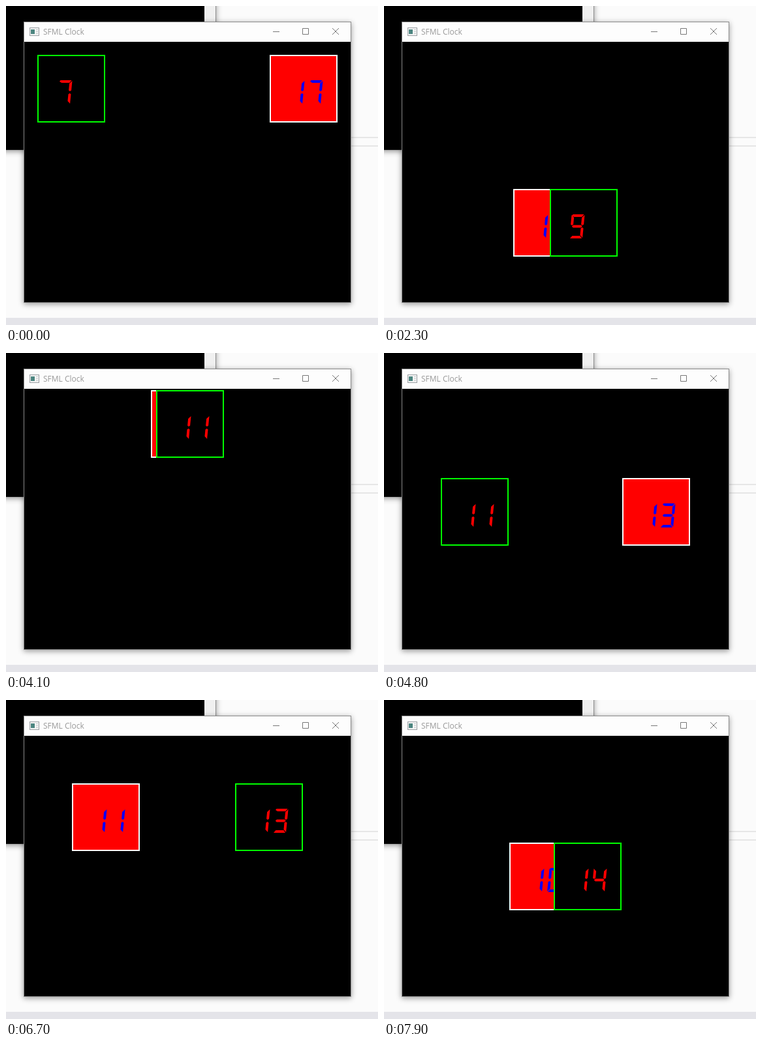
Write an HTML page that moves like this. It is 570 by 490 pixels and loops after 8 s.

```html
<!DOCTYPE html>
<html lang="en">
<head>
<meta charset="utf-8">
<title>SFML Clock</title>
<style>
html, body { margin: 0; width: 100%; height: 100%; overflow: hidden; background: #fbfbfb; }
svg { display: block; }
.shadow { filter: drop-shadow(0 2px 4px rgba(0, 0, 0, .4)); }
text { font: 12px "Open Sans", "Noto Sans", sans-serif; fill: #999; }
</style>
</head>
<body>
<svg width="570" height="490" viewBox="0 0 570 490">
  <rect width="570" height="490" fill="#fbfbfb"/>
  <path d="M528 202h42M528 215h42" stroke="#e6e6e6" stroke-width="2"/>
  <rect y="479" width="570" height="11" fill="#e4e4e9"/>

  <!-- console behind -->
  <g class="shadow">
    <rect x="-20" y="-20" width="342" height="241.5" fill="#8c8c8c"/>
    <rect x="304" y="-20" width="17" height="241" fill="#f0f0f0"/>
    <rect x="-20" y="-20" width="324" height="241" fill="#000"/>
  </g>

  <!-- clock window -->
  <rect class="shadow" x="27" y="24" width="502" height="432" fill="#8a8a8a"/>
  <rect x="28" y="25" width="500" height="30" fill="#fdfdfd"/>
  <rect x="28" y="55" width="500" height="400" fill="#000"/>
  <rect x="36.5" y="33.5" width="14" height="12" fill="#f4f4f4" stroke="#9a9fa3"/>
  <rect x="38" y="36" width="6" height="7" fill="#4b8580"/>
  <path d="M46 36.500h3M46 39.500h3M46 42.500h3" stroke="#c3c7c9"/>
  <text x="57" y="44">SFML Clock</text>
  <path d="M409 39.500h10M454.500 34.500h9v9h-9zM500 34l10 10M510 34l-10 10" fill="none" stroke="#777"/>

  <clipPath id="view"><rect x="28" y="55" width="500" height="400"/></clipPath>
  <g clip-path="url(#view)">
    <g id="down">
      <rect x="1" y="1" width="102" height="102" fill="#f00" stroke="#fff" stroke-width="2"/>
      <path fill="#00f"/>
    </g>
    <g id="up">
      <rect x="1" y="1" width="102" height="102" fill="#000" stroke="#0f0" stroke-width="2"/>
      <path fill="#f00"/>
    </g>
  </g>
</svg>
<script>
// Seven segments a..g, upright, in a 20 x 37 cell
const SEGMENTS = [
  [2, 0, 19, 0, 16, 4, 4, 4, .6, 2],
  [20, 1, 20, 15.5, 18, 17, 16, 15.5, 16, 5],
  [18, 20, 20, 21.5, 20, 36, 16, 32, 16, 21.5],
  [4, 33, 16, 33, 19, 37, 1, 37],
  [2, 20, 4, 21.5, 4, 32, 0, 36, 0, 21.5],
  [0, 1, 4, 5, 4, 15.5, 2, 17, 0, 15.5],
  [4, 16.5, 16, 16.5, 18, 18.5, 16, 20.5, 4, 20.5, 2, 18.5]
];
const DIGITS = ['abcdef', 'bc', 'abged', 'abgcd', 'fgbc', 'afgcd', 'afgedc', 'abc', 'abcdefg', 'abcdfg'];
const SLANT = 3.6 / 37;

// Time in ms and distance travelled along each axis; the view stalls twice
const TRAVEL = [[0, 0], [1000, 0], [1500, 88], [2300, 250], [3400, 475], [4800, 761], [5400, 880],
  [5500, 1000], [5900, 1000], [6000, 1005], [6700, 1147], [7900, 1388]];

function travel(t) {
  const i = Math.max(1, TRAVEL.findIndex(k => k[0] >= t));
  const [t0, d0] = TRAVEL[i - 1], [t1, d1] = TRAVEL[i];
  return d0 + (d1 - d0) * (t - t0) / (t1 - t0);
}

// Bounce back and forth between 0 and size
function bounce(p, size) {
  const m = (p + 2 * size) % (2 * size);
  return m < size ? m : 2 * size - m;
}

function segmentPath(points, left) {
  let d = '';
  for (let i = 0; i < points.length; i += 2) {
    const x = points[i], y = points[i + 1];
    d += (i ? 'L' : 'M') + (left + x + (37 - y) * SLANT) + ' ' + (39 + y);
  }
  return d + 'Z';
}

function numberPath(n) {
  return [...String(n)].map((digit, i) =>
    [...DIGITS[digit]].map(s => segmentPath(SEGMENTS['abcdefg'.indexOf(s)], 30 + 28 * i)).join('')
  ).join('');
}

function place(id, x, y, n) {
  const box = document.getElementById(id);
  box.setAttribute('transform', `translate(${Math.round(x)} ${Math.round(y)})`);
  box.querySelector('path').setAttribute('d', numberPath(n));
}

const start = performance.now();
function draw() {
  const t = Math.floor((performance.now() - start) % 8000 / 100) * 100;
  const p = travel(t) - 22;
  const x = 26 + bounce(p, 400), y = 53 + bounce(p, 300);
  const count = 7 + Math.max(0, Math.floor((t - 100) / 1000));
  place('down', 452 - x, y, 24 - count);
  place('up', x, y, count);
  requestAnimationFrame(draw);
}
draw();
</script>
</body>
</html>
```
